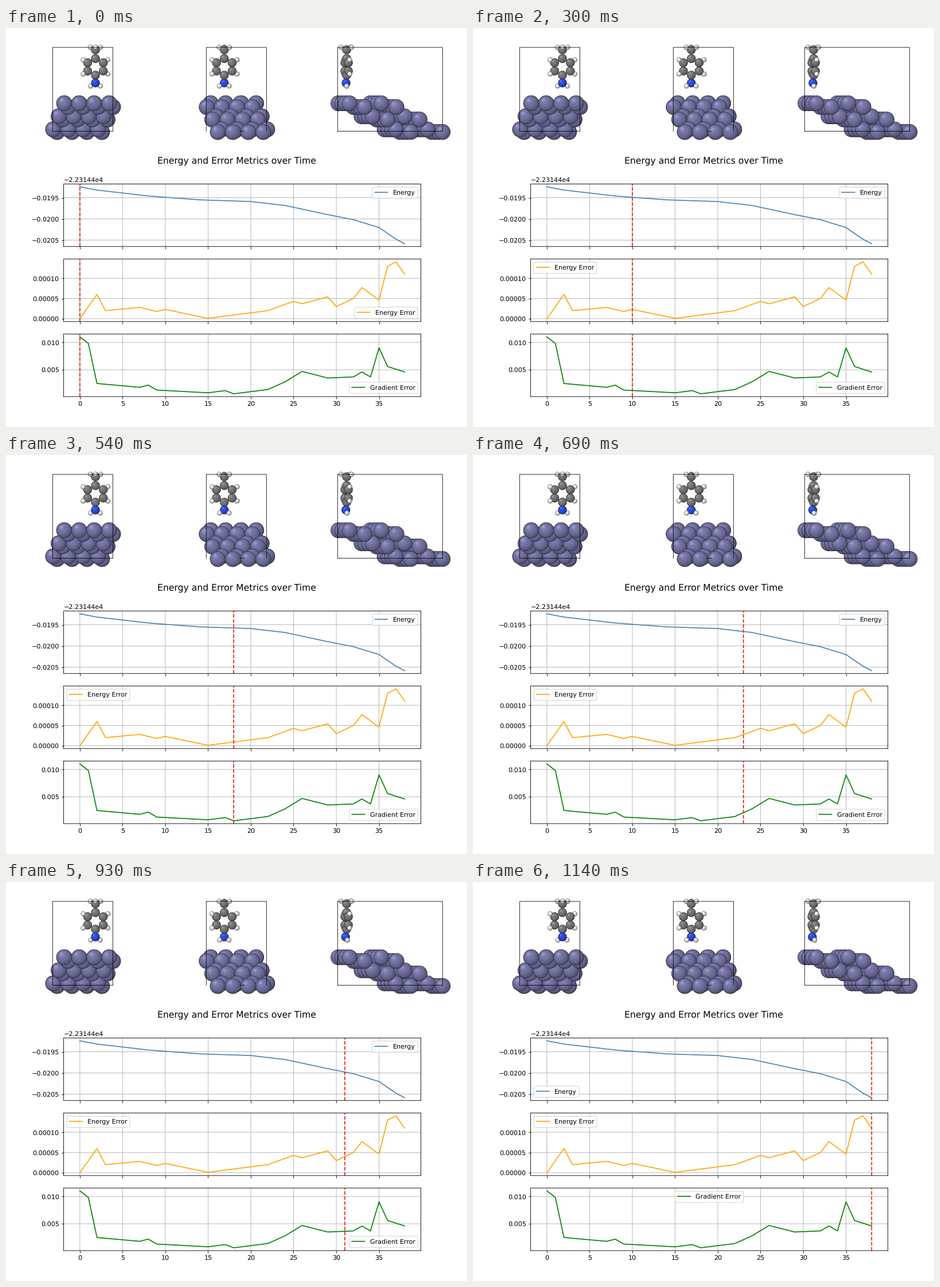
A matplotlib script that plays this animation: 804x697 px, repeating every 1.17 s.

```python
import numpy as np
import matplotlib.pyplot as plt
from matplotlib.animation import FuncAnimation

W, H, TOP = 804, 697, 215      # stage size and height of the atom strip
DPI = 80.4
PART = 0.6 * W / H             # share of the stage used by the chart block
STEPS = 39
plt.rcParams.update({"path.snap": False, "text.hinting": "none"})

# Element: radius in pixels, colour
BALLS = {
    "Zn": (13.7, (0.49, 0.49, 0.69)),
    "C": (7.7, (0.50, 0.50, 0.50)),
    "N": (7.6, (0.19, 0.32, 0.95)),
    "H": (4.3, (0.97, 0.97, 0.97)),
}
LIGHT = np.array([-0.36, -0.42, 0.83])
LIGHT /= np.linalg.norm(LIGHT)

# Views: (x, depth) -> horizontal position and nearness to the viewer
VIEWS = [
    lambda x, d: (x, -d),
    lambda x, d: (535.7 - x, d),
    lambda x, d: (d, x),
]


def slab():
    """Three layers, each with two sublattices of two rows of four atoms."""
    for layer, sub, row, i in np.ndindex(3, 2, 2, 4):
        x = 101 + 6.7 * sub - 9.6 * layer + 26.1 * i
        d = 578.3 + 26.3 * sub + 40.3 * layer + 55.6 * row + 6.4 * i
        y = 131 + 6.5 * sub + (22.8 - sub) * layer
        yield "Zn", x, d, y


def molecule(k):
    """Hexagonal ring, methyl group on top, amine swinging slowly below."""
    x0, d0, y0 = 155.5, 592.6, 68.4
    t = (k / (STEPS - 1)) ** 1.5
    for deg in range(0, 360, 60):
        s, c = np.sin(np.radians(deg)), np.cos(np.radians(deg))
        yield "C", x0 + 15.8 * s, d0 + 3.5 * s, y0 - 14.5 * c
        if deg % 180:
            yield "H", x0 + 24.8 * s, d0 + 6 * s, y0 - 24.8 * c
    yield "C", x0, d0, 38.5
    yield "N", x0, d0 - 1 - 1.3 * t, 96.5
    yield "H", x0, d0 - 10, 34
    for side in (-1, 1):
        yield "H", x0 + 9 * side, d0 + 7.5 + side, 34.2
        yield "H", x0 + (8.5 - 0.4 * t) * side, d0 + 1.7 * t, 101.8


def draw_ball(img, cx, cy, kind):
    r, color = BALLS[kind]
    x0, x1 = int(cx - r - 1), int(cx + r + 2)
    y0, y1 = int(cy - r - 1), int(cy + r + 2)
    yy, xx = np.mgrid[y0:y1, x0:x1]
    u, v = (xx - cx) / r, (yy - cy) / r
    dist = np.hypot(u, v)
    nz = np.sqrt(np.clip(1 - dist ** 2, 0, 1))
    lit = np.clip(u * LIGHT[0] + v * LIGHT[1] + nz * LIGHT[2], 0, 1)
    rim = np.clip((dist - 1) * r + 1.3, 0, 1)
    shade = (0.68 + 0.32 * lit) * (0.86 + 0.14 * nz) * (1 - 0.45 * rim)
    shine = 0.14 * lit ** 30
    rgb = np.clip(shade[..., None] * np.array(color) + shine[..., None], 0, 1)
    cover = np.clip((1 - dist) * r + 0.5, 0, 1)[..., None]
    patch = img[y0:y1, x0:x1]
    patch[:] = patch * (1 - cover) + rgb * cover


def draw_atoms(img, atoms):
    atoms = list(atoms)
    for view in VIEWS:
        placed = [(*view(x, d), y, kind) for kind, x, d, y in atoms]
        for h, _, y, kind in sorted(placed, key=lambda a: a[1]):
            draw_ball(img, h, y, kind)
    return img


steps = np.arange(STEPS)


def curve(*points):
    """Straight runs between a few (step, value) points."""
    return np.interp(steps, *zip(*points))


drop = curve((0, 42), (2, 118), (8, 258), (14, 349), (20, 389), (24, 482),
             (29, 698), (32, 817), (35, 1002), (37, 1279), (38, 1383))
energy_err = curve((0, 0), (2, 60), (3, 20), (7, 28), (9, 18), (10, 23),
                   (15, 1), (22, 20), (25, 43), (26, 37), (29, 54), (30, 30),
                   (32, 50), (33, 77), (35, 46), (36, 130), (37, 140.5),
                   (38, 110))
grad_err = curve((0, 110), (1, 98), (2, 25), (7, 18), (8, 22), (9, 13),
                 (15, 8), (17, 12), (18, 6.2), (22, 14), (24, 28), (26, 47),
                 (29, 35), (32, 37), (33, 46), (34, 37), (35, 90), (36, 56),
                 (38, 46))

fig, axes = plt.subplots(3, 1, sharex=True, dpi=DPI,
                         figsize=((W + 1e-6) / DPI, (H + 1e-6) / DPI))
fig.subplots_adjust(left=0.125, right=0.9, bottom=0.11 * PART,
                    top=0.88 * PART, hspace=0.2)
fig.suptitle("Energy and Error Metrics over Time", fontsize=14, y=0.98 * PART)

# Values, colour, label, legend place, step of its move, new place
charts = [
    (-22314.4192 - drop * 1e-6, "steelblue", "Energy",
     "upper right", 35, "lower left"),
    (energy_err * 1e-6, "orange", "Energy Error",
     "lower right", 6, "upper left"),
    (grad_err * 1e-4, "green", "Gradient Error",
     "lower right", 32, "upper center"),
]
markers, legends = [], []
for ax, (values, color, label, place, _, _) in zip(axes, charts):
    ax.plot(steps, values, color=color, label=label)
    ax.grid(True)
    markers.append(ax.axvline(0, color="#dc200f", linestyle="--"))
    legends.append(ax.legend(loc=place))

# Atom strip in pixel units, y pointing down
strip = fig.add_axes([0, 1 - TOP / H, 1, TOP / H])
strip.axis("off")
base = draw_atoms(np.ones((TOP, W, 3)), slab())
picture = strip.imshow(base, aspect="auto", interpolation="nearest")


def line(xs, ys):
    strip.plot(xs, ys, color="black", lw=0.75, scalex=False, scaley=False)


# Cells; the middle floor shows only in a gap of the front row
ceiling, floor = 33.4, 179.8
for left, width, gap in [(80.8, 105, None), (348.8, 105, (407, 415)),
                         (577.8, 183, None)]:
    right = left + width
    line([left, left, right, right], [floor, ceiling, ceiling, floor])
    line(gap or (left, right), [floor, floor])


def update(k):
    picture.set_data(draw_atoms(base.copy(), molecule(k)))
    for marker, legend, chart in zip(markers, legends, charts):
        marker.set_xdata([k, k])
        before, move, after = chart[3:]
        legend.set_loc(before if k < move else after)
    return [picture, *markers, *legends]


anim = FuncAnimation(fig, update, frames=STEPS, interval=30, repeat=True,
                     repeat_delay=0, blit=False)
plt.show()
```
